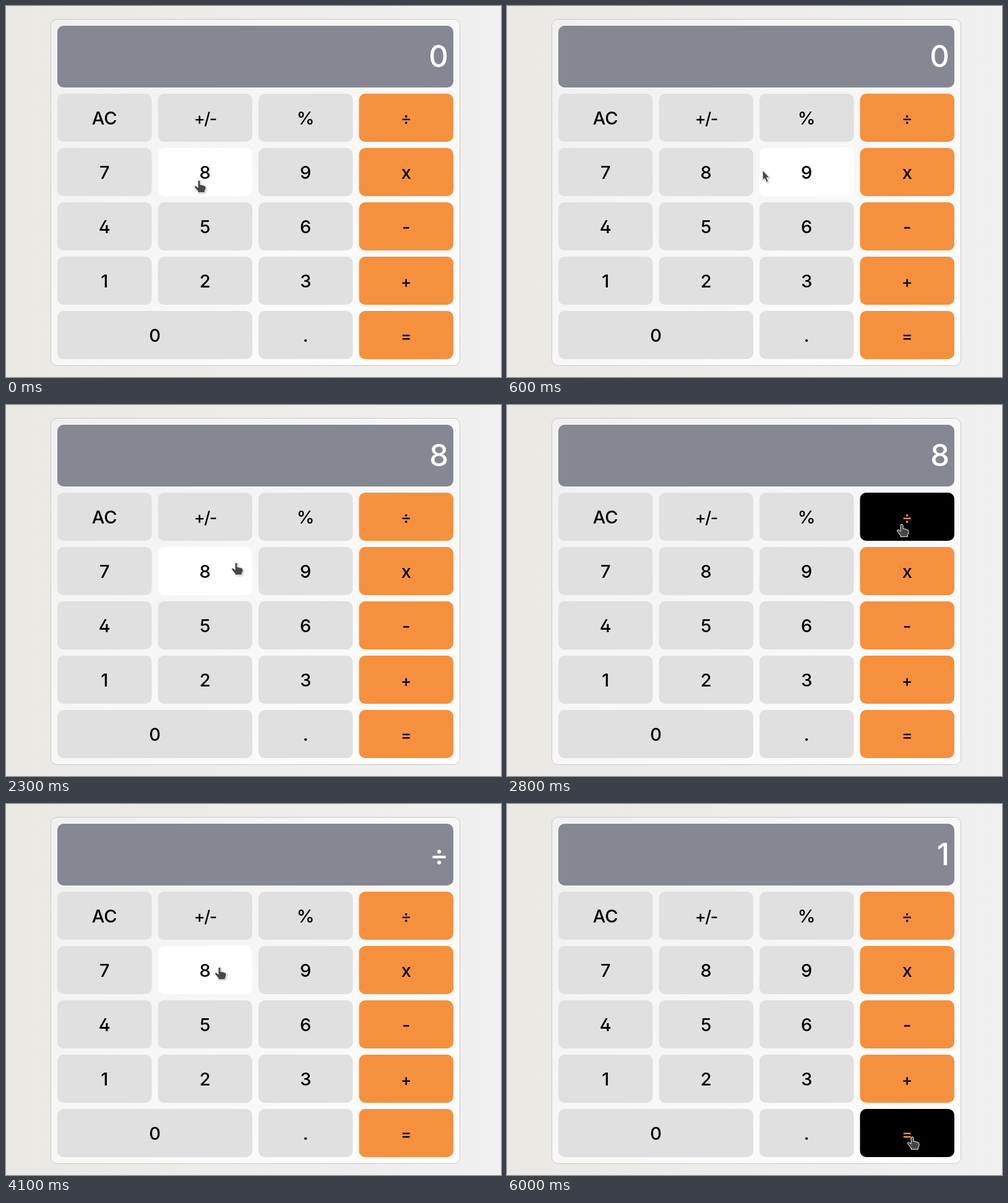
These frames come from a looping animation (800x601 px, 8000 ms). An HTML page:

```html
<!DOCTYPE html>
<html lang="en">
<head>
<meta charset="utf-8">
<title>Calculator</title>
<style>
  html, body { margin: 0; width: 100%; height: 100%; overflow: hidden; }
  body { background: linear-gradient(to right, #ebe9e4, #f0f0f0); }
  svg { display: block; width: 800px; height: 601px; }
  text { font: 500 29px Inter, sans-serif; font-feature-settings: "cv02"; text-anchor: middle; }
  .key rect { fill: #e0e0e0; }
  .key.hover rect { fill: #fff; }
  .op rect { fill: #f5913e; }
  .op.hover rect { fill: #000; }
  .op.hover text { fill: #f5913e; }
  #value { font-size: 49px; text-anchor: end; fill: #fff; }
  #cursor { fill: #484848; stroke: #fff; stroke-width: 1; stroke-linejoin: round;
    filter: drop-shadow(1px 1px 1px rgba(0, 0, 0, .25)); }
</style>
</head>
<body>
<svg viewBox="0 0 800 601">
  <defs>
    <linearGradient id="panel" x2="1" y2="1">
      <stop stop-color="#f0f0ef"/><stop offset="1" stop-color="#fefefe"/>
    </linearGradient>
  </defs>
  <rect x="72.5" y="21.5" width="661" height="561" rx="10" fill="url(#panel)" stroke="#c9c9c9"/>
  <rect x="83" y="32" width="640" height="100" rx="10" fill="#858793"/>
  <text id="value" x="715" y="98.5"></text>
  <g id="keys"></g>
  <path id="cursor"/>
</svg>
<script>
const LOOP = 8000, KEY_W = 152.5, KEY_H = 78, GAP = 10;
const HAND = 'M-2 2.2Q-2 .2 0 .2Q2 .2 2 2.2V7.5Q4.2 6.7 5 8.2Q7.2 7.4 8 9Q11 8.6 11 11.5V14.5L9.3 17.5V20.3H-2V18L-7 12Q-8.5 9.4-6 9Q-4.5 9-2 11.8Z';
const ARROW = 'M0 0V16.3L3.5 13.2L6.4 19.7L9.5 18.3L6.7 12H11.3Z';

const rows = [
  ['AC', '+/-', '%', '÷'],
  ['7', '8', '9', 'x'],
  ['4', '5', '6', '-'],
  ['1', '2', '3', '+'],
  ['0', null, '.', '='],
];

// [time, x, y, shape]: the pointer is sampled every 100 ms while it moves
const pointer = [
  [0, 312, 282, HAND],
  [200, 282, 280, HAND], [300, 222, 276, HAND], [400, 262, 272, HAND], [500, 352, 268, HAND],
  [600, 413, 266, ARROW], [700, 368, 265, HAND], [800, 318, 264, HAND],
  [2300, 372, 255, HAND], [2400, 514, 229, ARROW],
  [2800, 638, 193, HAND],
  [3500, 586, 203, HAND], [3600, 518, 217, HAND], [3700, 444, 237, HAND], [3800, 390, 251, HAND],
  [3900, 365, 258, HAND], [4000, 350, 263, HAND], [4100, 345, 264, HAND],
  [5000, 372, 284, HAND], [5100, 454, 348, HAND], [5200, 546, 430, HAND],
  [5300, 626, 509, HAND], [5400, 655, 539, HAND],
];
const display = [[0, '0'], [1400, '8'], [3100, '÷'], [4600, '8'], [6000, '1']];

const $ = id => document.getElementById(id);
const value = $('value'), cursor = $('cursor');

function add(parent, tag, attrs, text = '') {
  const el = document.createElementNS('http://www.w3.org/2000/svg', tag);
  for (const name in attrs) el.setAttribute(name, attrs[name]);
  el.textContent = text;
  return parent.appendChild(el);
}

const keys = [];
rows.forEach((labels, row) => labels.forEach((label, col) => {
  if (!label) return;
  const x = 83 + col * (KEY_W + GAP), y = 142 + row * (KEY_H + GAP);
  const w = label === '0' ? 2 * KEY_W + GAP : KEY_W;
  const el = add($('keys'), 'g', { class: col === 3 ? 'key op' : 'key' });
  add(el, 'rect', { x, y, width: w, height: KEY_H, rx: 10 });
  const text = add(el, 'text', { x: x + w / 2, y: y + 50 }, label);
  if ('÷+='.includes(label)) text.style.fontSize = '26px';
  if (label === '+/-') text.style.cssText = 'font-size: 27px; letter-spacing: -1.5px';
  keys.push({ el, x, y, w });
}));

const at = (list, t) => list.findLast(entry => entry[0] <= t);

function draw(now) {
  const t = now % LOOP;
  const [, px, py, shape] = at(pointer, t);
  const shown = at(display, t)[1];
  value.textContent = shown;
  value.style.fontSize = shown === '÷' ? '45px' : '';
  cursor.setAttribute('d', shape);
  cursor.setAttribute('transform', `translate(${px} ${py})`);
  for (const { el, x, y, w } of keys) {
    el.classList.toggle('hover', px >= x && px < x + w && py >= y && py < y + KEY_H);
  }
}

const start = performance.now();
function tick() {
  draw(performance.now() - start);
  requestAnimationFrame(tick);
}
tick();
</script>
</body>
</html>
```
